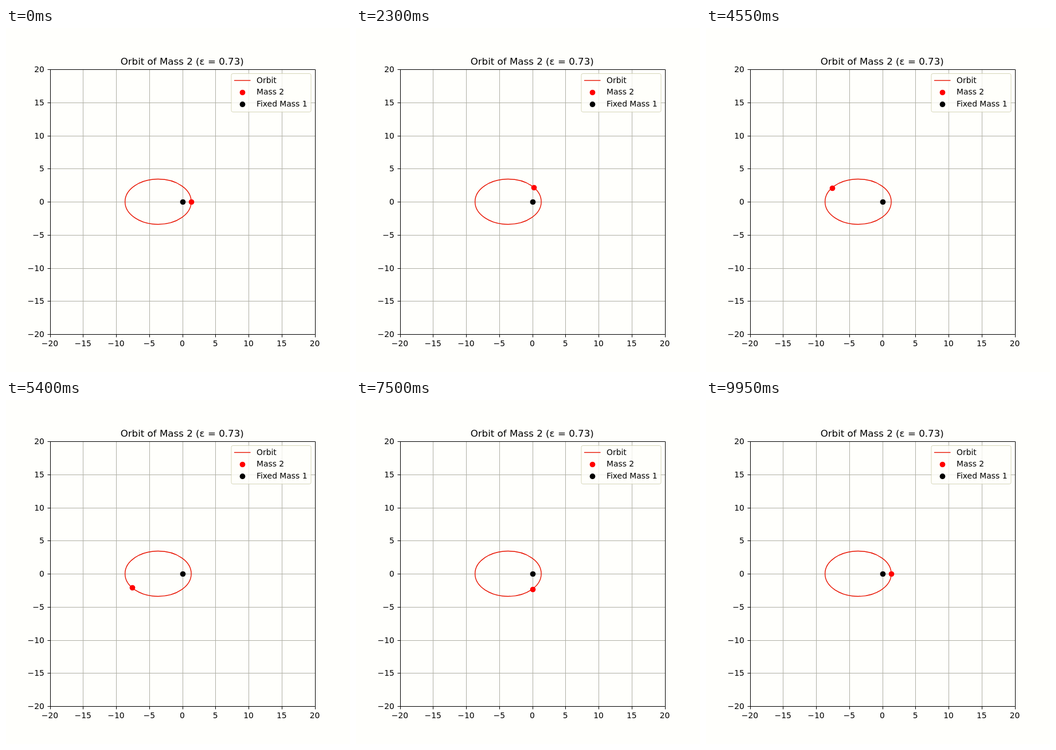
These frames come from a looping animation (600 px wide and 600 px high, 10000 ms). An HTML page:

```html
<!DOCTYPE html>
<html lang="en">
<head>
<meta charset="utf-8">
<title>Orbit</title>
<style>
  html, body { margin: 0; width: 100%; height: 100%; overflow: hidden; background: #fffffc; }
  svg { display: block; width: 600px; height: 600px; }
  text { font: 13.89px "DejaVu Sans", sans-serif; fill: #000; }
  .title { font-size: 16.67px; }
  .mid { text-anchor: middle; }
  .end { text-anchor: end; }
</style>
</head>
<body>
<svg id="plot" viewBox="0 0 600 600"></svg>
<script>
const STEP = 50, COUNT = 200;
const A = 5, ECC = 0.73;
const CX = 307.5, CY = 303, UNIT = 11.55;
const RED = '#ff0000', LINE = '#e81400';

const svg = document.getElementById('plot');
const snap = v => Math.floor(v + 0.5) + 0.5;
const px = x => CX + x * UNIT;
const py = y => CY - y * UNIT;

function add(tag, attrs, text) {
  const el = document.createElementNS('http://www.w3.org/2000/svg', tag);
  for (const key in attrs) el.setAttribute(key, attrs[key]);
  if (text) el.textContent = text;
  svg.appendChild(el);
  return el;
}
const path = (d, stroke, width = 1) =>
  add('path', { d, stroke, 'stroke-width': width, fill: 'none' });
const label = (x, y, text, cls = '') => add('text', { x, y, class: cls }, text);
const dot = (cx, cy, fill) => add('circle', { cx, cy, r: 4.86, fill });

const ticks = Array.from({ length: 9 }, (_, i) => i * 5 - 20);
const left = snap(px(-20)), right = snap(px(20));
const top_ = snap(py(20)), bottom = snap(py(-20));

// Grid
for (const v of ticks) {
  path(`M${snap(px(v))} ${top_}V${bottom}M${left} ${snap(py(v))}H${right}`, '#b0b0a6');
}

// Orbit, with one focus at the origin
add('ellipse', {
  cx: px(-A * ECC), cy: CY,
  rx: A * UNIT, ry: A * Math.sqrt(1 - ECC * ECC) * UNIT,
  fill: 'none', stroke: LINE, 'stroke-width': 1.39
});
const mass = dot(0, 0, RED);
dot(snap(CX), snap(CY), '#000');

// Frame, tick marks and labels
path(`M${left} ${top_}H${right}V${bottom}H${left}Z`, '#000');
for (const v of ticks) {
  const x = snap(px(v)), y = snap(py(v));
  const text = String(v).replace('-', '\u2212');
  path(`M${x} ${bottom}v5M${left} ${y}h-5`, '#000');
  label(px(v), 555, text, 'mid');
  label(66.8, y + 4.8, text, 'end');
}
label(307.2, 64, 'Orbit of Mass 2 (ε = 0.73)', 'title mid');

// Legend
add('rect', {
  x: 393, y: 79.5, width: 139, height: 67, rx: 2.8,
  fill: '#fffffc', 'fill-opacity': 0.8, stroke: '#ccccaa', 'stroke-opacity': 0.8
});
path('M398 91.5h28.5', LINE, 1.39);
dot(412.5, 112.5, RED);
dot(412.5, 133.2, '#000');
['Orbit', 'Mass 2', 'Fixed Mass 1'].forEach((s, i) => label(437, 96 + i * 20.4, s));

// The true anomaly advances evenly through one full turn
function draw(ms) {
  const i = Math.floor(ms / STEP) % COUNT;
  const angle = 2 * Math.PI * i / (COUNT - 1);
  const r = A * (1 - ECC * ECC) / (1 + ECC * Math.cos(angle));
  mass.setAttribute('cx', snap(px(r * Math.cos(angle))));
  mass.setAttribute('cy', snap(py(r * Math.sin(angle))));
}

const start = performance.now();
function tick() {
  draw(performance.now() - start);
  requestAnimationFrame(tick);
}
tick();
</script>
</body>
</html>
```
